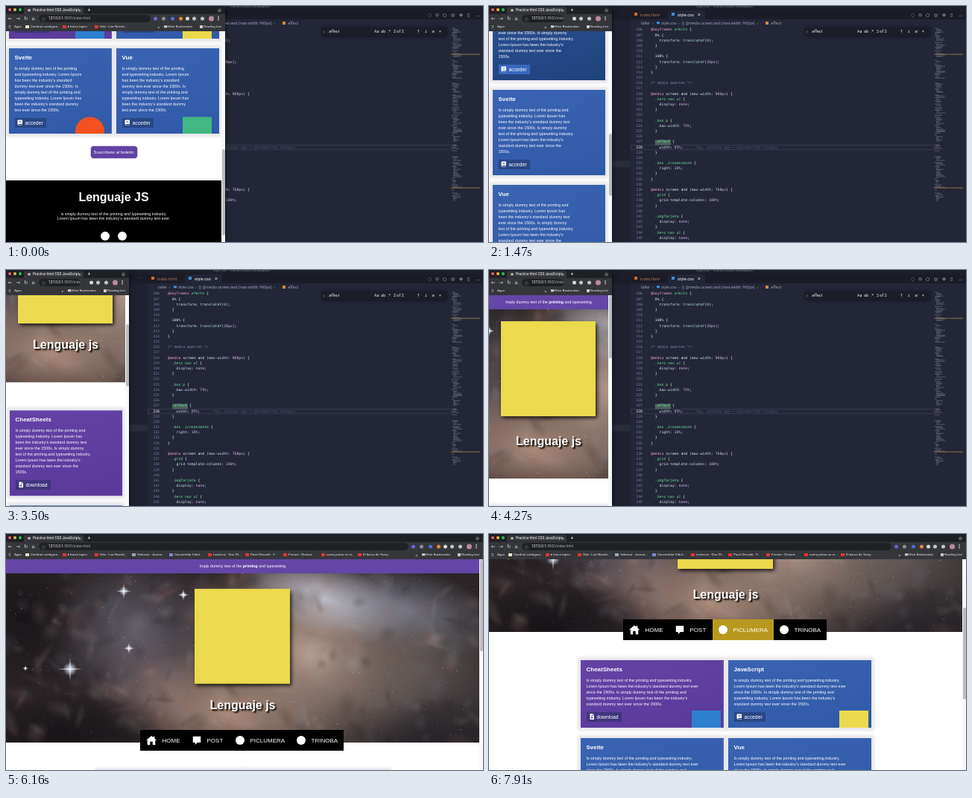
An HTML page with a canvas that plays this animation: 640 by 318 pixels, repeating every 8 s.

```html
<!DOCTYPE html>
<html lang="es">
<head>
<meta charset="utf-8">
<title>Lenguaje JS</title>
<style>
* { box-sizing: border-box; margin: 0; padding: 0; }
html, body { width: 100%; height: 100%; overflow: hidden; background: #232637; }
#stage { position: relative; width: 640px; height: 318px; overflow: hidden; font: 5.33px "Liberation Sans", Arial, sans-serif; }
#stage div, #stage canvas, .put { position: absolute; }
.put { white-space: pre; transform: translateY(-50%); line-height: 1.2; }

#editor { inset: 0; z-index: 0; background: #232637; color: #9a9cb0; font: 4.8px Roboto, sans-serif; }
#code { top: 28.4px; left: 190px; z-index: 1; width: 407px; font: 4.8px/7.2px "DejaVu Sans Mono", monospace; color: #f0f0f5; }
#code p { height: 7.2px; white-space: pre; }
#code b { display: inline-block; width: 27px; padding-right: 11px; text-align: right; font-weight: 400; color: #777c9c; }
#code i { font-style: normal; }
#code .now { box-shadow: inset 0 0 0 .5px #4a4d62; }
#code .now b { color: #fff; }
#code em { color: #50556f; }
.c0 { color: #8088a8; } .c1 { color: #f0a0cc; } .c2 { color: #cfe4f0; }
.c3 { color: #d9b8f2; } #code .c4 { color: #6ee894; font-style: italic; } .c5 { color: #b5e6f2; }

#browser { left: 0; top: 0; height: 318px; overflow: hidden; background: #35363a; box-shadow: 0 0 6px #000a; }
#bar { inset: 0 0 auto; height: 34px; color: #eeeff1; font: 4.4px Roboto, sans-serif; }
#pill { left: 44px; top: 12px; height: 10px; border-radius: 5px; background: #202124; overflow: hidden; font-size: 4.8px; color: #a8aab0; }
#pill b { font-weight: 400; color: #fff; }
#view { left: 0; top: 34px; height: 284px; overflow: hidden; background: #fff; }
#track { right: 0; top: 34px; width: 5px; height: 284px; background: #f8f8f8; }
#thumb { left: 1px; width: 3.5px; border-radius: 2px; background: #bcbcbe; }

#page { left: 0; top: 0; width: 100%; }
#stage #banner { position: static; height: 19px; background: #6446a6; color: #fff; text-align: center; line-height: 19px; white-space: nowrap; }
#hero { top: 19px; left: 0; width: 100%; height: 228px; overflow: hidden; background: #3a3533; }
#sky { left: 50%; margin-left: -320px; }
#square { left: 50%; top: 17.2px; width: 127.5px; height: 127.5px; margin-left: -64.5px; background: #ecd94d; box-shadow: 2px 3px 5px #000c; }
#hero h1 { position: absolute; top: 169px; width: 100%; text-align: center; font-size: 16px; line-height: 18px; color: #fff; text-shadow: 2px 2px 2px #000; }
nav { display: none; position: absolute; top: 230px; left: 50%; margin-left: -137.5px; width: 273px; height: 28px; background: #000; color: #fff; font-size: 8px; }
nav span { display: flex; align-items: center; gap: 8px; padding-left: 7.5px; }
nav span.hot { background: #b9981f; }
svg { fill: currentColor; flex: none; }
main { display: grid; width: calc(100% - 9px); margin: 266px auto 0; gap: 13px 6px; grid-template-columns: 100%; }
article { position: relative; box-shadow: 0 0 4px 4px #e6e6ea; color: #fff; }
#stage .card { position: relative; overflow: hidden; padding: 8px 8px 8.5px; background: linear-gradient(165deg, #3a64b3, #3059a8); }
#stage .violet { background: linear-gradient(165deg, #6443a6, #59399a); }
#stage .hot .card { background: linear-gradient(165deg, #2b5397, #20427b); }
.card h2 { font-size: 8px; line-height: 10px; margin-bottom: 5px; }
.card p { width: 75%; line-height: 8px; }
.card a { display: inline-flex; align-items: center; gap: 3px; height: 13px; margin-top: 6.5px; padding: 0 4px 0 3px; font-size: 6.8px; vertical-align: top; background: #1c2d5573; }
.hot a { background: #3767c0; }
.logo { display: none; right: 10px; bottom: -17.7px; width: 39px; height: 39px; }
#stage #join { position: relative; left: 50%; width: 62px; height: 16px; margin: 17px 0 30px -31px; border-radius: 4px; background: #5f42a3; color: #fff; font-size: 6px; line-height: 16px; text-align: center; box-shadow: 0 0 2px #5f42a3; }
footer { position: relative; height: 106px; background: #000; color: #fff; text-align: center; }
footer > * { position: absolute; width: 100%; left: 0; white-space: nowrap; }
footer h2 { top: 13px; font-size: 16px; line-height: 19px; }
footer p { top: 42px; line-height: 6.1px; }
footer small { top: 97px; font: bold 4.2px/6px "Liberation Sans", sans-serif; }
footer span { top: 69px; display: flex; justify-content: center; gap: 11px; }
.dot { width: 12px; height: 12px; border-radius: 50%; background: #fff; flex: none; }
.two main, .wide main { grid-template-columns: 1fr 1fr; width: calc(100% - 7px); }
.two .logo, .wide .logo { display: block; }
.wide nav { display: flex; }
.wide main { row-gap: 14px; max-width: 390px; }
.wide .card p { width: 88%; }
.wide .logo { right: 4px; }
</style>
</head>
<body>
<div id="stage">
  <div id="editor"><div id="code"></div></div>
  <div id="browser">
    <div id="bar"><div id="pill"></div></div>
    <div id="view"><div id="page">
      <div id="banner">Imply dummy text of the <b>printing</b> and typesetting</div>
      <div id="hero"><canvas id="sky" width="640" height="228"></canvas><div id="square"></div><h1>Lenguaje js</h1></div>
      <nav></nav>
      <main></main>
      <div id="join">Suscribete al boletin</div>
      <footer>
        <h2>Lenguaje JS</h2>
        <p>is simply dummy text of the printing and typesetting industry.<br>Lorem Ipsum has been the industry's standard dummy text ever.</p>
        <span><i class="dot"></i><i class="dot"></i></span>
        <small>© Copyright 2021 Practice</small>
      </footer>
    </div></div>
    <div id="track"><div id="thumb"></div></div>
  </div>
</div>
<script>
const $ = id => document.getElementById(id);
const query = s => document.querySelector(s);
const LOOP = 8000;

let seed = 11;
const random = () => (seed = seed * 16807 % 2147483647) / 2147483647;

// Text centred on y; a negative x is measured from the right edge
function put(parent, x, y, text, css = '') {
  const el = document.createElement('span');
  el.className = 'put';
  el.style.cssText = `${x < 0 ? 'right' : 'left'}:${Math.abs(x)}px;top:${y}px;${css}`;
  el.textContent = text;
  parent.append(el);
  return el;
}
const box = (parent, x, y, w, h, color, css = '') =>
  put(parent, x, y + h / 2, '', `width:${w}px;height:${h}px;background:${color};${css}`);
const icon = (path, size) => `<svg width="${size}" height="${size}" viewBox="0 0 16 16"><path fill-rule="evenodd" d="${path}"/></svg>`;

// ---------- editor ----------
const source = `@keyframes efecto {
  0% {
    transform: translateY(0);
  }

  100% {
    transform: translateY(20px);
  }
}

/* media queries */

@media screen and (max-width: 960px) {
  .hero nav ul {
    display: none;
  }

  .box p {
    max-width: 75%;
  }

  .effect {
    width: 85%;
  }

  .box .iconanimate {
    right: 10%;
  }
}

@media screen and (max-width: 768px) {
  .grid {
    grid-template-columns: 100%;
  }

  .imgTarjeta {
    display: none;
  }
  .hero nav ul {
    display: none;`;
const tokens = /(\/\*.*)|(@\w+)|([\w-]+(?=:))|(\d+px|\d+%(?=;)|none|0(?=\)))|(^ +\..*(?= \{)|efecto)|(translateY)/g;
const paint = line => line.replace(tokens, (m, ...groups) => `<i class="c${groups.findIndex(Boolean)}">${m}</i>`);

const editor = $('editor');
box(editor, 0, 0, 640, 6, '#1d1e29');
box(editor, 0, 6, 640, 12, '#1b1c27');
box(editor, 165, 18, 25, 300, '#1f2130');
box(editor, 165, 208, 25, 9, '#2a2c3a');
box(editor, 240, 6, 50, 12, '#232637');
box(editor, 222.5, 180, 21, 7.5, '#4d625c');
put(editor, 278, 1, 'style.css — Practice notes (Workspace)', 'font-size:4.4px;color:#777a8c');
put(editor, 179, 11, '···');
box(editor, 195, 9, 4, 4, '#d9692f');
put(editor, 203, 11.5, 'index.html', 'color:#b5704e;font-size:5.6px');
box(editor, 245, 9, 4, 4, '#3f8fd6');
put(editor, 253, 11.5, 'style.css', 'color:#fff;font-size:5.6px');
put(editor, 280, 11.5, '×', 'color:#ddd;font-size:7px');
[568, 578, 588, 599, 610, 621, 632].forEach((x, i) =>
  put(editor, x - 2, 11, '◌⊙○◎⊕▯…'[i], 'color:#c0c2d0;font:6px "DejaVu Sans",sans-serif'));
const crumbs = 'color:#9c9fb4;font-size:5.3px';
put(editor, 204, 23, 'taller  ›', crumbs);
box(editor, 225, 21, 3.5, 3.5, '#3f8fd6');
put(editor, 231, 23, 'style.css  ›  {} @media screen and (max-width: 960px)  ›', crumbs);
box(editor, 371, 21, 4, 4, '#d98a3a');
put(editor, 377, 23, '.effect', crumbs);

$('code').innerHTML = source.split('\n').map((line, i) => {
  const current = i === 22;
  const blame = current ? '<em>      You, seconds ago • Uncommitted changes</em>' : '';
  return `<p${current ? ' class="now"' : ''}><b>${306 + i}</b>${paint(line)}${blame}</p>`;
}).join('');

box(editor, 424, 28, 168, 12, '#1c1d28', 'box-shadow:0 1px 4px #0008');
[[426, '›'], [432, '.effect'], [494, 'Aa'], [503, 'ab'], [512, '.*'], [520, '2 of 2'], [551, '↑'], [561, '↓'], [571, '≡'], [581, '×']]
  .forEach(([x, text]) => put(editor, x, 34, text, 'color:#f0f0f4;font:5.4px Roboto,"DejaVu Sans",sans-serif'));

const inks = ['#8a8ea4', '#6f9a86', '#8495a8', '#9a86a4', '#9a9cae'];
let indent = 0;
for (let y = 28; y < 262; y += 1.6) {
  const roll = random();
  if (roll < .15) { indent = 0; continue; }
  box(editor, 598 + indent, y, 3 + random() * (indent ? 10 : 7), .8, inks[Math.floor(random() * 5)], 'opacity:.5');
  indent = roll < .4 ? 0 : 1.5;
}
[65, 244.5].forEach(y => box(editor, 597, y, 39, .8, '#94783f'));

// ---------- browser frame ----------
const bar = $('bar');
box(bar, 0, 0, 640, 10.5, '#1f2023');
box(bar, 24, 1.5, 80, 9, '#35363a', 'border-radius:3px 3px 0 0');
['#f25f57', '#f8bc2e', '#2bc840'].forEach((c, i) => box(bar, 2.5 + 7 * i, 3, 4, 4, c, 'border-radius:50%'));
box(bar, 29, 4, 3.5, 3.5, '#b9bbc0', 'border-radius:50%');
put(bar, 36, 5.8, 'Practice html CSS JavaScript', 'font-size:4.8px;color:#fff');
put(bar, 97.5, 5.8, '×', 'font-size:6px');
put(bar, 109.5, 5.5, '+', 'font-size:7px');
box(bar, -5, 3, 5, 5, '#55565b', 'border-radius:50%');
['←', '→', '↻', '⌂'].forEach((c, i) => put(bar, 3 + 10.5 * i, 17, c, 'font:6.5px "DejaVu Sans",sans-serif'));
const pill = $('pill');
put(pill, 4, 5, 'ⓘ', 'font:4.5px "DejaVu Sans",sans-serif');
put(pill, 13, 5.2, '').innerHTML = '<b>127.0.0.1:</b>5500/index.html';
bar.append(pill);
const tools = [[91, '#6a62d8'], [80, '#8a8c92'], [68, '#4c6fd0'], [57, '#e58a35'], [48, '#d8d9dc'], [39, '#c4c5c9'], [28, '#c4c5c9']]
  .map(([x, c]) => box(bar, -x, 14.5, 5, 5, c, 'border-radius:50%'));
box(bar, -15, 13.5, 7, 7, '#b78a9a', 'border-radius:50%');
put(bar, -5.5, 17, '⋮', 'font:bold 7px "DejaVu Sans",sans-serif');

put(bar, 3, 28, '⠿', 'font:5px "DejaVu Sans",sans-serif');
put(bar, 11, 28, 'Apps');
const bookmarks = [
  [26, '#e9e2c8', 'Cambiar configura...'], [76, '#e0352f', '▸ loose tapes'], [119, '#e0352f', 'Oda - Live Nordvi...'],
  [169, '#9aa6b8', 'Velmora - Journe...'], [219, '#7f86d0', 'Convertidor Vidul...'], [271, '#e0352f', 'Lanterns - One Of...'],
  [321, '#e0352f', 'Pavel Drosnik - Y...'], [372, '#e0352f', 'Ferrum - Distant...'], [423, '#e0352f', 'como pintar un m...'],
  [472, '#e0352f', 'El barco de Tomy...']
].map(([x, c, text]) => ({ x, parts: [box(bar, x, 26, 4.5, 4, c), put(bar, x + 7, 28, text)] }));
put(bar, -88, 28, '»', 'font-size:6px');
box(bar, -78, 26, 4, 3.5, '#c9cacd');
put(bar, -44, 28, 'Other Bookmarks');
box(bar, -30.5, 26, 3.5, 4, '#c9cacd');
put(bar, -5, 28, 'Reading List');

// ---------- page ----------
const house = 'M8 1L0 8h2v7h4v-5h4v5h4V8h2L13 5V2h-2v1.5z';
const bubble = 'M1 1h14v11H9l-4 4v-4H1z';
const book = 'M3 1h11v11H4q-1 1 0 2h10v1H3q-2-1-2-3V3q0-2 2-2zM5 4v1h6V4zM5 6v1h6V6z';
const sheet = 'M3 0h6v5h5v11H3zM10 0l4 4h-4zM7 7v3H5l3 4 3-4H9V7z';
const dot = '<i class="dot"></i>';
query('nav').innerHTML = [['HOME', 62, icon(house, 14)], ['POST', 58, icon(bubble, 12)], ['PICLUMERA', 82, dot], ['TRINOBA', 71, dot]]
  .map(([name, w, mark]) => `<span style="width:${w}px">${mark}${name}</span>`).join('');
const navItem = query('nav').children[2];

const lorem = "Is simply dummy text of the printing and typesetting industry. Lorem Ipsum has been the industry's standard dummy text ever since the 1500s. ";
query('main').innerHTML = [['CheatSheets', '#2f7fcf'], ['JavaScript', '#ecd94d'], ['Svelte', '#f4511e'], ['Vue', '#41b883']]
  .map(([name, color], i) => `<article><div class="card ${i ? '' : 'violet'}"><h2>${name}</h2><p>${lorem.repeat(2)}</p>
    <a>${icon(i ? book : sheet, 8)}${i ? 'acceder' : 'download'}</a>
    <div class="logo" style="background:${color};${i === 2 ? 'border-radius:50%' : ''}"></div></div></article>`).join('');
const cards = [...document.querySelectorAll('article')];
const floaters = [$('square'), ...document.querySelectorAll('.logo')];

function drawSky() {
  const g = $('sky').getContext('2d');
  const glow = (x, y, rx, ry, color, turn = 0) => {
    g.save();
    g.translate(x, y);
    g.rotate(turn);
    g.scale(rx, ry);
    const fade = g.createRadialGradient(0, 0, 0, 0, 0, 1);
    fade.addColorStop(0, color);
    fade.addColorStop(1, color.slice(0, 7) + '00');
    g.fillStyle = fade;
    g.fillRect(-1, -1, 2, 2);
    g.restore();
  };
  g.fillStyle = '#2a2426';
  g.fillRect(0, 0, 640, 228);
  glow(175, 80, 120, 110, '#6e6a78c8');
  glow(215, 160, 110, 80, '#7d6c70b0', .5);
  glow(300, 190, 150, 80, '#b8937fe0', .2);
  glow(410, 110, 190, 140, '#c2a898e8', .3);
  glow(430, 35, 120, 50, '#ccccd8e0', .3);
  glow(540, 50, 130, 60, '#9096a8b0', .25);
  glow(560, 130, 150, 100, '#6c6462b0');
  glow(25, 60, 90, 100, '#120e12b0');
  glow(80, 220, 160, 65, '#141014d0');
  glow(590, 220, 140, 55, '#26242ac0');
  for (let i = 0; i < 260; i++)
    glow(random() * 640, random() * 228, 5 + random() * 22, 4 + random() * 12,
      ['#1b151830', '#c8b8b022', '#8088a022', '#9a605828'][i % 4], random() * 3);
  for (let i = 0; i < 600; i++) {
    g.fillStyle = `rgba(240,${205 + random() * 30},225,${.12 + random() * .4})`;
    const r = .4 + random() * .8;
    g.fillRect(random() * 640, random() * 228, r, r);
  }
  [[88, 129, 17], [160, 24, 11], [240, 29, 8], [167, 101, 8], [28, 128, 4]].forEach(([x, y, r]) => {
    glow(x, y, r, 1.4, '#ffffffff');
    glow(x, y, 1.4, r, '#ffffffff');
    glow(x, y, r / 1.8, r / 1.8, '#e8efffff');
  });
}
drawSky();

// ---------- motion ----------
const widths = [[0, 294], [140, 294], [1120, 165], [5600, 165], [6130, 640], [LOOP, 640]];
const scrolls = [[0, 390], [140, 390], [145, 518], [1190, 518], [1470, 462], [1960, 462], [2310, 669], [2380, 669],
  [3500, 130], [4060, 0], [6300, 0], [7070, 149], [LOOP, 149]];
function track(keys, t) {
  const i = keys.findIndex(k => k[0] > t);
  const [t0, a] = keys[i - 1], [t1, b] = keys[i];
  return a + (b - a) * (t - t0) / (t1 - t0);
}
const show = (el, visible) => el.style.display = visible ? '' : 'none';

function render() {
  const t = performance.now() % LOOP;
  const width = track(widths, t);
  const mode = width >= 366 ? 'wide' : width >= 293 ? 'two' : 'one';
  const roomy = width > 200;
  const page = $('page');

  $('browser').style.width = width + 'px';
  $('view').style.width = width - 5 + 'px';
  page.className = mode;
  pill.style.width = width - 44 - (roomy ? 100 : 65) + 'px';
  tools.forEach((tool, i) => show(tool, roomy || i > 3));
  bookmarks.forEach(({ x, parts }) => parts.forEach(el => show(el, x + 44 < width - 95)));

  const height = page.offsetHeight;
  const scroll = Math.min(track(scrolls, t), height - 284);
  page.style.transform = `translateY(${-scroll}px)`;
  $('thumb').style.top = scroll * 284 / height + 'px';
  $('thumb').style.height = 284 * 284 / height + 'px';

  const pointer = 36 + scroll;
  const hovering = mode === 'one' && t > 1190 && t < 5250;
  cards.forEach(card => card.classList.toggle('hot',
    hovering && pointer > card.offsetTop && pointer < card.offsetTop + card.offsetHeight));
  navItem.classList.toggle('hot', t >= 7900);

  const bob = 3.8 * Math.cos((t - 3500) / 2660 * 2 * Math.PI);
  floaters.forEach(el => el.style.transform = `translateY(${bob}px)`);
  requestAnimationFrame(render);
}
render();
</script>
</body>
</html>
```
